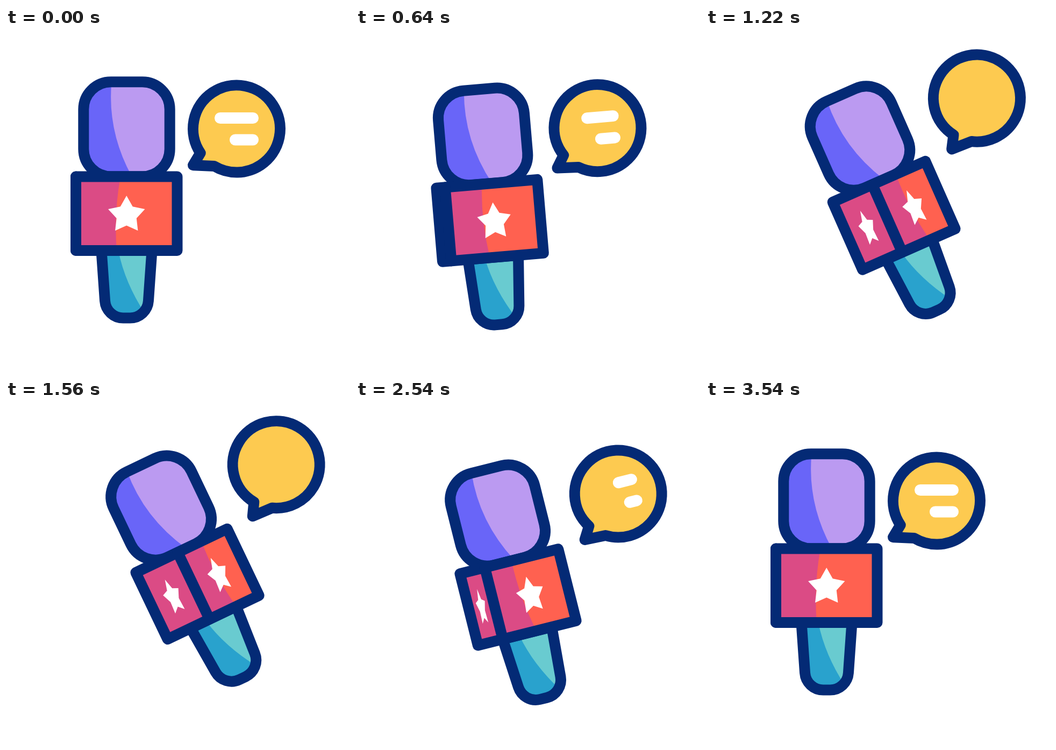
An HTML page with a canvas for the animation above (3600 ms loop, 640x640 px).

```html
<!DOCTYPE html>
<html lang="en">
<head>
<meta charset="utf-8">
<title>Microphone</title>
<style>
  html, body { margin: 0; height: 100%; overflow: hidden; background: #fff; }
  canvas { display: block; width: 640px; height: 640px; }
</style>
</head>
<body>
<canvas id="stage" width="640" height="640"></canvas>
<script>
const ctx = document.getElementById('stage').getContext('2d');
const LOOP = 3600, SWING = 1740, MAX_ANGLE = 25.7 * Math.PI / 180;
const NAVY = '#042a75', WHITE = '#fff';
const clamp = v => Math.min(1, Math.max(0, v));
const smooth = v => v * v * (3 - 2 * v);

// cubic-bezier(.72, 0, .205, 1), solved by bisection
function ease(x) {
  if (x <= 0 || x >= 1) return clamp(x);
  let lo = 0, hi = 1;
  for (let i = 0; i < 24; i++) {
    const s = (lo + hi) / 2, r = 1 - s;
    if (3 * s * r * r * 0.72 + 3 * s * s * r * 0.205 + s * s * s < x) lo = s;
    else hi = s;
  }
  return smooth(lo);
}

function fill(path, color) {
  ctx.fillStyle = color;
  ctx.fill(path);
}

function stroke(path, color = NAVY, width = 20) {
  ctx.strokeStyle = color;
  ctx.lineWidth = width;
  ctx.stroke(path);
}

// Fill whose left part, up to a curved edge, is darker
function shaded(shape, light, dark, [x0, y0, cx, cy, x1, y1]) {
  fill(shape, light);
  ctx.save();
  ctx.clip(shape);
  const shade = new Path2D();
  shade.moveTo(100, y0);
  shade.lineTo(x0, y0);
  shade.quadraticCurveTo(cx, cy, x1, y1);
  shade.lineTo(100, y1);
  fill(shade, dark);
  ctx.restore();
}

function star(x, scale) {
  const path = new Path2D();
  for (let i = 0; i < 10; i++) {
    const a = i * Math.PI / 5, r = i % 2 ? 19.5 : 36;
    path.lineTo(x + Math.sin(a) * r * scale, 348 - Math.cos(a) * r);
  }
  fill(path, WHITE);
}

const head = new Path2D();
head.roundRect(144.3, 100.3, 160.4, 176, 51);

const handle = new Path2D();
handle.moveTo(177.5, 414);
handle.arcTo(186.3, 539.5, 224.5, 539.5, 34);
handle.arcTo(262.7, 539.5, 271.5, 414, 34);
handle.lineTo(271.5, 414);
handle.closePath();

const BOX_LEFT = 130, BOX_WIDTH = 188.5;
const box = new Path2D();
box.rect(BOX_LEFT, 276.5, BOX_WIDTH, 137.5);

const bubble = new Path2D();
bubble.arc(0, 0, 81, 2.552, 2.11 + 2 * Math.PI);
bubble.lineTo(-81, 67.8);
bubble.closePath();

// The divider slides in; each side keeps a star squeezed to its width
function drawBox(f) {
  const slide = 87 * f, edge = BOX_LEFT + slide, side = slide / BOX_WIDTH;
  const top = 213 + 53 * f * f, bottom = 206 + 66 * f;
  shaded(box, '#ff6150', '#db4b85',
    [top, 276.5, (top + bottom) / 2 - 9, 345, bottom, 414]);
  star(BOX_LEFT + slide / 2, side);
  star((edge + BOX_LEFT + BOX_WIDTH) / 2, 1 - side);
  stroke(box);
  const divider = new Path2D();
  divider.moveTo(edge, 276.5);
  divider.lineTo(edge, 414);
  stroke(divider);
}

function drawBubble(f) {
  ctx.save();
  ctx.translate(429 + 25.5 * Math.sin(2 * f), 187.5 + 20.5 * smooth(clamp(1.3 * f)));
  fill(bubble, '#fdca50');
  stroke(bubble);
  const trim = 1.08 * f;
  if (trim < 1) {
    for (const [length, y] of [[61, -20], [33, 20.5]]) {
      const line = new Path2D();
      line.moveTo(30.5 - length * (1 - trim), y);
      line.lineTo(30.5, y);
      stroke(line, WHITE, 21);
    }
  }
  ctx.restore();
}

function draw(t) {
  const f = t < SWING ? ease(t / SWING) : 1 - ease(t / SWING - 1);
  const a = f * MAX_ANGLE;
  ctx.fillStyle = WHITE;
  ctx.fillRect(0, 0, 640, 640);
  ctx.lineJoin = ctx.lineCap = 'round';
  ctx.save();
  ctx.translate(224.5 + a * (272 + 320 * a - 600 * a * a),
    345 + a * (186 - 358 * a - 167 * a * a));
  ctx.rotate(-a);
  ctx.translate(-224.5, -345);
  shaded(handle, '#69cbd0', '#29a2cd', [209, 414, 221, 474, 259, 532]);
  stroke(handle);
  shaded(head, '#bb9af1', '#6965f8', [196.5, 100, 188, 192, 234, 276]);
  stroke(head);
  drawBox(f);
  drawBubble(f);
  ctx.restore();
}

const start = performance.now();
function tick() {
  draw((performance.now() - start) % LOOP);
  requestAnimationFrame(tick);
}
tick();
</script>
</body>
</html>
```
